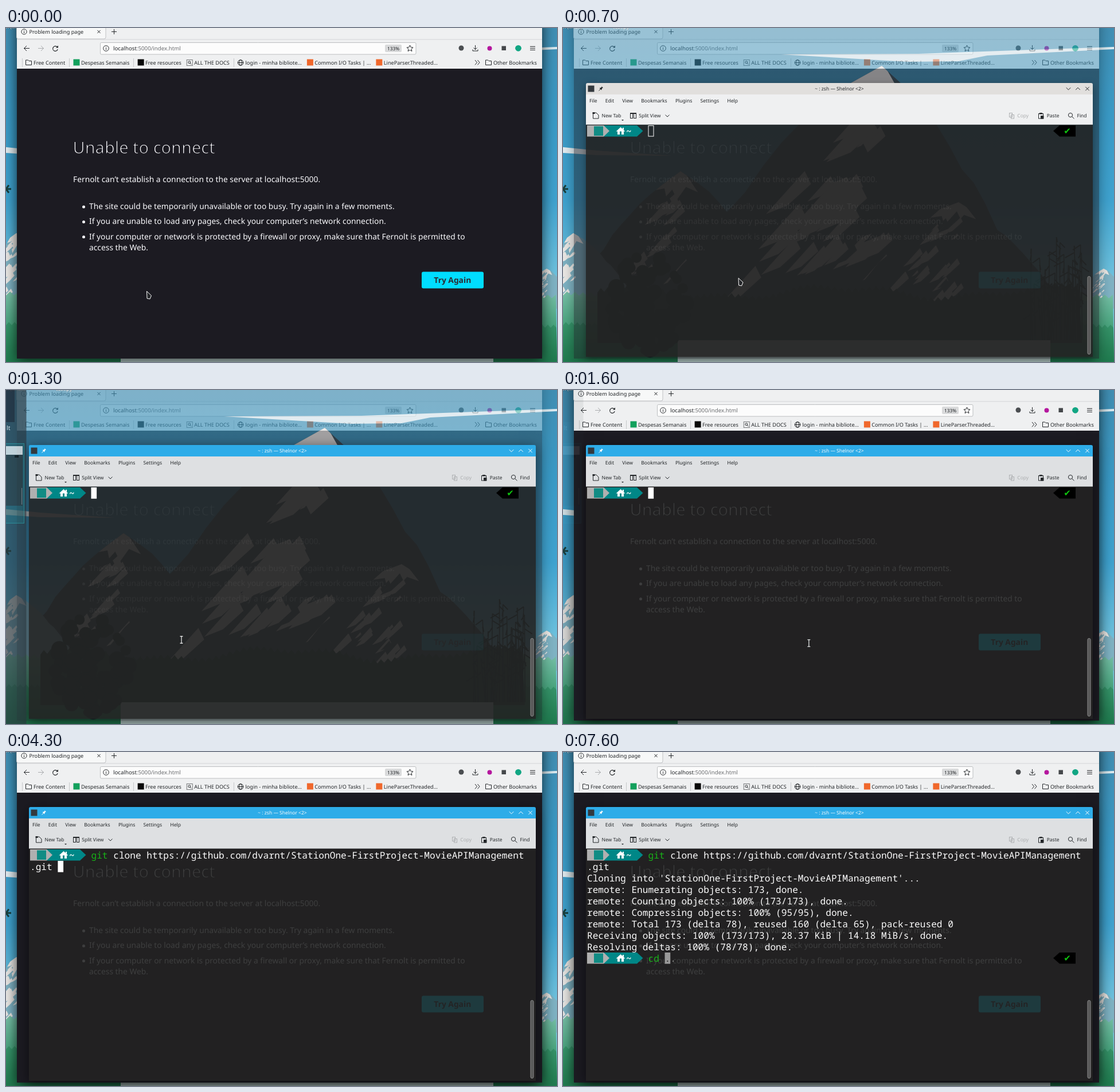
Write an HTML page with a canvas that moves like this. It is 961x583 px and loops after 8000 ms.

```html
<!DOCTYPE html>
<html lang="en">
<head>
<meta charset="utf-8">
<title>Cloning a repository</title>
<style>
html, body { margin: 0; width: 100%; height: 100%; overflow: hidden; background: #2b6f98; }
canvas { display: block; width: 961px; height: 583px; }
</style>
</head>
<body>
<canvas id="stage" width="961" height="583"></canvas>
<script>
const W = 961, H = 583, LOOP = 8000;
const SANS = '"Noto Sans", "Open Sans", sans-serif';
const MONO = '"Noto Sans Mono", "DejaVu Sans Mono", monospace';
const INK = '#232629', SNOW = '#ebe9e6';

const clamp = v => Math.max(0, Math.min(1, v));
const ramp = (t, from, length) => clamp((t - from) / length);
const mix = (a, b, u) => a + (b - a) * u;

// ---------- drawing helpers ----------
function rect(g, x, y, w, h, fill) { g.fillStyle = fill; g.fillRect(x, y, w, h); }

function frameBox(g, x, y, w, h, color = INK) {
  g.strokeStyle = color; g.lineWidth = 1; g.strokeRect(x, y, w, h);
}

function round(g, x, y, w, h, r, fill, stroke) {
  g.beginPath(); g.roundRect(x, y, w, h, r);
  g.fillStyle = fill; g.fill();
  if (stroke) { g.strokeStyle = stroke; g.lineWidth = 1; g.stroke(); }
}

function trace(g, pts) {
  g.beginPath();
  for (let i = 0; i < pts.length; i += 2) g.lineTo(pts[i], pts[i + 1]);
}

function poly(g, pts, fill, stroke) {
  trace(g, pts); g.closePath();
  if (fill) { g.fillStyle = fill; g.fill(); }
  if (stroke) { g.strokeStyle = stroke; g.lineWidth = 1; g.stroke(); }
}

function line(g, pts, color = INK, width = 1) {
  trace(g, pts); g.strokeStyle = color; g.lineWidth = width; g.stroke();
}

function disc(g, x, y, r, fill) {
  g.beginPath(); g.arc(x, y, r, 0, 7); g.fillStyle = fill; g.fill();
}

function ring(g, x, y, rx, ry = rx, color = INK) {
  g.beginPath(); g.ellipse(x, y, rx, ry, 0, 0, 7);
  g.strokeStyle = color; g.lineWidth = 1; g.stroke();
}

// Draws text and returns its width.
function text(g, s, x, y, size, color = INK, weight = 400, align = 'left') {
  g.font = `${weight} ${size}px ${SANS}`;
  g.textAlign = align; g.fillStyle = color;
  g.fillText(s, x, y);
  return g.measureText(s).width;
}

function cross(g, x, y, r, color) {
  line(g, [x - r, y - r, x + r, y + r], color);
  line(g, [x - r, y + r, x + r, y - r], color);
}

function chevron(g, x, y, r, dir, color) {
  line(g, [x - r, y - dir * r / 2, x, y + dir * r / 2, x + r, y - dir * r / 2], color);
}

// Shadow only outside the box, so translucent windows stay clean.
function shadow(g, x, y, w, h, blur, alpha) {
  g.save();
  g.beginPath(); g.rect(0, 0, W, H); g.rect(x, y, w, h); g.clip('evenodd');
  g.shadowColor = `rgba(0,0,0,${alpha})`; g.shadowBlur = blur; g.shadowOffsetY = 4;
  rect(g, x, y, w, h, '#000');
  g.restore();
}

function vertical(g, y0, y1, colors) {
  const grad = g.createLinearGradient(0, y0, 0, y1);
  colors.forEach((c, i) => grad.addColorStop(i / (colors.length - 1), c));
  return grad;
}

function layer(draw) {
  const c = document.createElement('canvas');
  c.width = W; c.height = H;
  const g = c.getContext('2d');
  g.textRendering = 'geometricPrecision';
  draw(g);
  return c;
}

function randomFrom(seed) {
  return () => (seed = (seed * 16807) % 2147483647) / 2147483647;
}

// ---------- desktop ----------
function streak(g, x, y, l, fill) {
  poly(g, [x, y, x - l * .9, y + l, x - l * .4, y + l * .8, x + l * .15, y + l * .3], fill);
}

// A peak with concave, jagged flanks and snow falling to the lower left.
function mountain(g, x, y, base, left, right, rock, count, seed) {
  const rnd = randomFrom(seed), h = base - y, steps = 12, pts = [];
  for (let i = -steps; i <= steps; i++) {
    const v = Math.abs(i) / steps, span = i < 0 ? -left : right;
    pts.push(x + span * v ** .75, y + h * v + (i % steps ? (rnd() - .5) * h * .04 : 0));
  }
  g.save();
  poly(g, pts, rock);
  trace(g, pts); g.clip();
  poly(g, [x, y - 9, x - left * .32, y + h * .16, x - left * .14, y + h * .13,
    x - left * .1, y + h * .3, x + right * .05, y + h * .12, x + right * .16, y + h * .16], SNOW);
  for (let i = 0; i < count; i++) {
    const v = .08 + rnd() * .75, sx = x + (rnd() * .75 - .65) * left * v ** .75;
    streak(g, sx, y + h * v, h * (.06 + rnd() * .16), i % 4 ? SNOW : rock);
  }
  g.restore();
}

function ridge(g, x0, x1, base, amp, step, bottom, fill) {
  const pts = [x0, bottom];
  for (let x = x0; x <= x1; x += step) {
    const wave = Math.sin(x / 61) + Math.sin(x / 23 + 2) * .5 + (x / step & 1 ? .5 : -.3);
    pts.push(x, base - amp * wave);
  }
  pts.push(x1, bottom);
  poly(g, pts, fill);
}

function desktop(g) {
  const rnd = randomFrom(77), rock = '#3b525d', leaf = '#10302f';
  rect(g, 0, 0, W, H, vertical(g, 0, 450, ['#418fb4', '#3a9ac6', '#3fa3d0', '#74c6e0']));
  poly(g, [380, 46, 620, 45, 961, 33, 961, 37, 740, 48, 690, 58, 600, 59], '#dcebf1');
  poly(g, [0, 208, 60, 214, 190, 223, 60, 222, 0, 218], '#e4eef2');
  mountain(g, 205, 250, 480, 200, 190, rock, 22, 5);
  mountain(g, 556, 66, 490, 400, 270, rock, 46, 9);
  mountain(g, 690, 304, 490, 210, 190, rock, 34, 21);
  mountain(g, 18, 358, 475, 70, 110, '#7fb3c4', 40, 3);
  mountain(g, 943, 420, 490, 60, 60, '#7fb3c4', 40, 14);
  ridge(g, 0, W, 468, 8, 7, H, vertical(g, 455, H, ['#7cc4ac', '#4aa57f', '#23794f']));
  ridge(g, 0, W, 520, 7, 5, H, vertical(g, 505, H, ['#3b9a70', '#1f7a4e']));
  ridge(g, 60, 905, 462, 9, 6, 550, '#1d443c');
  rect(g, 200, 545, 650, 38, '#b9cfcc');
  for (let i = 0; i < 90; i++) {
    const v = rnd(), wide = 65 * Math.sin(Math.PI * (.15 + v * .7));
    disc(g, 150 + (rnd() * 2 - 1) * wide, 400 + v * 165, 7 + rnd() * 8, leaf);
  }
  for (let i = 0; i < 34; i++) {
    const x = 815 + rnd() * 90, y = 362 + rnd() * 120;
    line(g, [x, y, x + 8 - rnd() * 16, 545], leaf, 1.5);
    for (let k = 0; k < 3; k++) line(g, [x, y + k * 12, x + (rnd() - .5) * 36, y + k * 12 + 9], leaf, 2);
  }
  for (let a = -3; a < 4; a++) line(g, [0, 281, 9 * Math.cos(a), 281 + 8 * Math.sin(a)], '#173f3c', 3);
  g.shadowColor = '#000'; g.shadowBlur = 2;
  text(g, 'vm (linux)', -8, 1, 9, '#fff');
  text(g, 'test.py', 87, 1, 9, '#fff');
}

// ---------- browser ----------
function info(g, x, y, r) {
  ring(g, x, y, r);
  rect(g, x - .5, y - .5, 1, 3, INK);
  rect(g, x - .5, y - 2.6, 1, 1.2, INK);
}

function arrow(g, x, dir, color) {
  line(g, [x - 5, 35.5, x + 5, 35.5], color);
  line(g, [x, 31, x + 4.5 * dir, 35.5, x, 40], color);
}

function toolbarIcons(g) {
  arrow(g, 36, -1, INK);
  arrow(g, 61, 1, '#aaacae');
  g.beginPath(); g.arc(86, 36, 4.3, .3, 5.5); g.strokeStyle = INK; g.lineWidth = 1.2; g.stroke();
  poly(g, [87, 34.5, 91, 34.5, 91, 30.5], INK);
  const star = [];
  for (let i = 0; i < 10; i++) {
    const a = i * Math.PI / 5 - Math.PI / 2, r = i % 2 ? 2.7 : 5.8;
    star.push(704.5 + r * Math.cos(a), 35.8 + r * Math.sin(a));
  }
  poly(g, star, null, INK);
  disc(g, 794, 35, 4.5, '#4b4e51');
  line(g, [818.5, 30, 818.5, 37.5]);
  chevron(g, 818.5, 36, 3, 1, INK);
  line(g, [814, 37.5, 814, 40, 823, 40, 823, 37.5]);
  disc(g, 843.5, 35.5, 4, '#b5179e');
  rect(g, 864.5, 31.5, 7.5, 7.5, '#45484b');
  disc(g, 893.5, 35.3, 5.4, '#11a683');
  for (let y = 32; y < 40; y += 3) line(g, [914, y + .3, 923, y + .3]);
}

// Bookmark icons, drawn from their left edge.
const square = color => (g, x) => rect(g, x, 54.5, 11, 11, color);

function folder(g, x) {
  poly(g, [x, 56, x + 4, 56, x + 5.5, 57.5, x + 10, 57.5, x + 10, 64.5, x, 64.5], null, INK);
}

function lens(g, x) {
  frameBox(g, x + .5, 55.5, 10, 10, '#77797b');
  ring(g, x + 5, 59.8, 2);
  line(g, [x + 6.5, 61.3, x + 8.5, 63.5]);
}

function globe(g, x) {
  ring(g, x + 5, 60.5, 4.8); ring(g, x + 5, 60.5, 2.2, 4.8);
  line(g, [x, 60.5, x + 10, 60.5]);
}

function bookmarks(g) {
  let x = 34.5;
  const separator = at => rect(g, Math.round(at), 53, 1, 15, '#c6c8ca');
  const item = (icon, label, last) => {
    icon(g, x);
    x += 13.4 + text(g, label, x + 13.4, 63.5, 9.15);
    if (last) separator(x + 7);
    x += last ? 14.3 : 9;
  };
  separator(28);
  item(folder, 'Free Content', true);
  item(square('#12a05c'), 'Despesas Semanais', true);
  item(square('#0a0a0a'), 'Free resources');
  item(lens, 'ALL THE DOCS', true);
  item(globe, 'login - minha bibliote...');
  item(square('#f0682c'), 'Common I/O Tasks | ...');
  item(square('#f0682c'), 'LineParser.Threaded...');
  for (const left of [818, 822.5]) line(g, [left, 56, left + 3.5, 60.2, left, 64.4]);
  x = 836.5;
  item(folder, 'Other Bookmarks');
}

function errorPage(g) {
  const ink = '#fbfbfe', paper = '#1c1b22';
  rect(g, 19, 71, 916, 506, paper);
  // The heading is thinned by shaving its edges with the page colour.
  const title = 'Unable to connect';
  text(g, title, 116.5, 219, 29, ink);
  g.strokeStyle = paper; g.lineWidth = 1.2; g.lineJoin = 'round';
  g.strokeText(title, 116.5, 219);
  g.lineJoin = 'miter';
  text(g, 'Fernolt can’t establish a connection to the server at localhost:5000.', 117, 269, 13.8, ink);
  ['The site could be temporarily unavailable or too busy. Try again in a few moments.',
   'If you are unable to load any pages, check your computer’s network connection.',
   'If your computer or network is protected by a firewall or proxy, make sure that Fernolt is permitted to'
  ].forEach((s, i) => {
    const y = 316 + i * 26.25;
    text(g, s, 145, y, 13.8, ink);
    disc(g, 135.5, y - 3.7, 2.5, ink);
  });
  text(g, 'access the Web.', 145, 388, 13.8, ink);
  round(g, 725, 425.5, 108, 29, 3, '#00ddff');
  text(g, 'Try Again', 778.8, 445.2, 13.8, '#2b2a33', 700, 'center');
}

function browser(g) {
  shadow(g, 19, -20, 916, 597, 22, .75);
  rect(g, 19, 0, 916, 71, '#eff0f1');
  rect(g, 19, 19.5, 916, 1, '#d3d5d7');
  round(g, 18.5, -8, 155.5, 27, 3, '#f7f8f8', '#bfc1c3');
  info(g, 31.5, 6.5, 4.6);
  text(g, 'Problem loading page', 40.5, 10.3, 9.15);
  cross(g, 162, 6.5, 2.6, INK);
  line(g, [184, 6.5, 193, 6.5]); line(g, [188.5, 2, 188.5, 11]);
  round(g, 164.5, 25.5, 550.5, 20.5, 2, '#fcfcfc', '#bcbec0');
  info(g, 174.5, 35.5, 4.8);
  const host = text(g, 'localhost', 187, 39, 9.7);
  text(g, ':5000/index.html', 187 + host, 39, 9.7, '#6b6d70');
  round(g, 661, 29, 29, 13, 2, '#d9dadb');
  text(g, '133%', 675.5, 38.6, 8.3, INK, 400, 'center');
  toolbarIcons(g);
  bookmarks(g);
  errorPage(g);
}

// ---------- window switcher at the left edge ----------
function switcher(g) {
  rect(g, 0, 0, 35.5, H, 'rgba(42,54,62,.8)');
  rect(g, 0, 0, 15, 56, 'rgba(28,30,42,.8)');
  text(g, 'lt', 1, 70, 10.5, '#fcfcfc');
  rect(g, -2, 93.5, 33.5, 139, 'rgba(30,130,140,.35)');
  frameBox(g, -2, 93.5, 33.5, 139, '#2a8c92');
  rect(g, 0, 98, 29, 15, '#dfe3e5');
  rect(g, 0, 113, 29, 89, '#2a3a40');
  rect(g, 15, 114, 7, 4, '#0c0f10');
  rect(g, 27, 171, 1.2, 29, '#7a8488');
}

// ---------- terminal ----------
const CELL = 9.68, LEFT = 42, TOP = 170, COLS = 89, START = 11;
const REPO = 'StationOne-FirstProject-MovieAPIManagement';
const CLONE = `git clone https://github.com/dvarnt/${REPO}.git `;
const CHANGE = 'cd ..';
const OUTPUT = [
  'remote: Enumerating objects: 173, done.',
  'remote: Counting objects: 100% (173/173), done.',
  'remote: Compressing objects: 100% (95/95), done.',
  'remote: Total 173 (delta 78), reused 160 (delta 65), pack-reused 0',
  'Receiving objects: 100% (173/173), 28.37 KiB | 14.18 MiB/s, done.',
  'Resolving deltas: 100% (78/78), done.'
];
const GREEN = '#18b218', RED = '#e04040', WHITE = '#fcfcfc', GHOST = '#8b8b8b';

const place = (col, row) => [LEFT + col % COLS * CELL, TOP + (row + Math.floor(col / COLS)) * 20];
const keysDown = (t, times) => times.filter(k => t >= k).length;

function print(g, s, col, row, color) {
  g.font = `16.13px ${MONO}`; g.textAlign = 'left'; g.fillStyle = color;
  [...s].forEach((ch, i) => {
    const [x, y] = place(col + i, row);
    g.fillText(ch, x, y + 15.6);
  });
}

function block(g, col, row, active, under) {
  const [x, y] = place(col, row);
  if (!active) return frameBox(g, x + .5, y + .5, 9, 18.5, WHITE);
  rect(g, x, y, CELL, 19.7, under ? '#999' : '#fff');
  if (under) print(g, under, col, row, '#222');
}

function tag(g, x0, x1, tip, y, fill) {
  poly(g, [x0, y, x1, y, tip, y + 9.8, x1, y + 19.6, x0, y + 19.6], fill);
}

function prompt(g, row) {
  const y = TOP + row * 20;
  tag(g, 71, 129, 139.5, y, '#008787');
  tag(g, 42, 71, 81, y, '#b0b0b0');
  rect(g, 54, y + 1.5, 16, 16.5, '#128c84');
  poly(g, [92.5, y + 10.5, 100.5, y + 3, 108.5, y + 10.5], '#fff');
  rect(g, 95, y + 9, 4, 7, '#fff'); rect(g, 102, y + 9, 4, 7, '#fff');
  rect(g, 104, y + 4, 2, 4, '#fff');
  g.font = `700 16.13px ${MONO}`; g.textAlign = 'left'; g.fillStyle = '#fff';
  g.fillText('~', 110, y + 15.6);
}

function tick(g, row) {
  const y = TOP + row * 20;
  tag(g, 894, 866, 855, y, '#000');
  g.font = '15px "DejaVu Sans", sans-serif'; g.textAlign = 'center'; g.fillStyle = '#0fc20f';
  g.fillText('✔', 879.5, y + 15.3);
}

// A command being typed, with the rest of the suggestion in grey.
function command(g, full, count, word, hint, row, active) {
  const color = hint || count >= word ? GREEN : RED;
  print(g, full.slice(0, Math.min(count, word)), START, row, color);
  print(g, full.slice(word, count), START + word, row, WHITE);
  if (hint) print(g, full.slice(count), START + count, row, GHOST);
  if (active !== null) block(g, START + count, row, active, hint ? full[count] : '');
}

function shell(g, t, active) {
  const pairs = Math.floor(3 * ramp(t, 2800, 600));
  const typed = keysDown(t, [2300, 2400, 2700, 2800]) + 2 * pairs;
  const hint = t >= 2700 && t < 4300, sent = t >= 5800;
  prompt(g, 0);
  if (t < 2700) tick(g, 0);
  command(g, CLONE, t < 4300 ? typed : CLONE.length, 3, hint, 0, sent ? null : active);
  if (!sent) return;
  print(g, `Cloning into '${REPO}'...`, 0, 2, WHITE);
  if (t < 6500) return block(g, 0, 3, true);
  OUTPUT.forEach((s, i) => print(g, s, 0, 3 + i, WHITE));
  prompt(g, 9);
  tick(g, 9);
  const n = keysDown(t, [7300, 7400, 7600]);
  command(g, CHANGE, n, 2, n > 0, 9, true);
}

function terminalTools(g) {
  const y = 156.3, dim = '#adafb1';
  let x = 46;
  for (const s of ['File', 'Edit', 'View', 'Bookmarks', 'Plugins', 'Settings', 'Help'])
    x += text(g, s, x, 130, 8.55) + 14.2;
  poly(g, [52.5, 148, 58, 148, 62, 152, 62, 158, 52.5, 158], null, INK);
  rect(g, 51.5, 147, 4, 3, INK);
  text(g, 'New Tab', 67.5, y, 8.5);
  poly(g, [102, 160, 106, 160, 104, 162], INK);
  for (const left of [117.5, 123.5]) frameBox(g, left, 148.5, 4, 9);
  rect(g, 117, 148, 11, 2, INK);
  text(g, 'Split View', 132.3, y, 8.5);
  chevron(g, 182, 153.3, 3.5, 1, INK);
  frameBox(g, 778.5, 148.5, 5, 7, dim); frameBox(g, 781.5, 151.5, 5, 6.5, dim);
  text(g, 'Copy', 792.3, y, 8.5, dim);
  frameBox(g, 829.5, 149.5, 8, 8.5);
  rect(g, 831, 148, 5, 2.5, INK); rect(g, 833, 153, 5.5, 5.5, INK);
  text(g, 'Paste', 843.7, y, 8.5);
  ring(g, 885, 152, 3.6); line(g, [887.6, 154.6, 891.5, 158.3]);
  text(g, 'Find', 896.5, y, 8.5);
}

function terminal(g, t) {
  const active = t >= 1300, ink = active ? WHITE : INK;
  shadow(g, 40, 96, 884, 478, active ? 20 : 12, active ? .55 : .4);
  rect(g, 40, 168, 884, 406, 'rgba(35,35,35,.875)');
  round(g, 40, 96, 884, 24, [3, 3, 0, 0], active ? '#2eace8' : '#e1dfdd');
  rect(g, 40, 116, 884, 52, active ? '#dee0e2' : '#eff0f1');
  rect(g, 40, 168, 884, 1, active ? '#8f9193' : '#b5b7b9');
  rect(g, 43.5, 100.5, 11, 11, '#33393e');
  line(g, [62.5, 109.5, 65.5, 106.5], ink);
  poly(g, [63.5, 105, 67, 103.8, 67.5, 102, 70, 104.5, 68.2, 105, 67, 108.5], ink);
  const task = t >= 6200 && t < 7000 ? 'git' : 'zsh';
  text(g, `~ : ${task} — Shelnor <2>`, 482, 109, 8.5, ink, 400, 'center');
  chevron(g, 881.5, 106, 3.8, 1, ink);
  chevron(g, 898, 106, 3.8, -1, ink);
  cross(g, 914.5, 106, 3.2, ink);
  terminalTools(g);
  round(g, 915, 433.5, 5, 136, 2.5, '#565656', '#8b8b8b');
  shell(g, t, active);
}

// ---------- pointer ----------
function pointer(g, t) {
  if (t >= 2300) return;
  if (t < 1300) {
    const u = ramp(t, 0, 200), x = mix(245, 305.5, u), y = mix(459, 436, u);
    poly(g, [x + .5, y + .5, x + 8.5, y + 8, x + 6, y + 14, x + 1, y + 13], '#26282b', '#fff');
    return;
  }
  // A quick sideways flick that sinks as it slows down.
  const u = ramp(t, 1300, 600);
  const x = mix(306, 476, 1 - (1 - u) ** 1.85), y = mix(436, 467, u ** 2.4);
  const beam = [x - 2.5, y - 6, x + 2.5, y - 6, x, y - 6, x, y + 6, x - 2.5, y + 6, x + 2.5, y + 6];
  line(g, beam, '#1b1d1f', 3);
  line(g, beam, '#e8e8e8', 1.3);
}

// ---------- playback ----------
const wall = layer(desktop), web = layer(browser), side = layer(switcher);
const stage = document.getElementById('stage').getContext('2d');
stage.textRendering = 'geometricPrecision';

const webFade = t => 1 - .78 * (t < 1300 ? ramp(t, 500, 400) ** .6 : 1 - ramp(t, 1200, 400) ** 1.3);
const sideFade = t => ramp(t, 700, 200) * (1 - ramp(t, 1250, 500)) ** 2;

function image(src, alpha) {
  stage.globalAlpha = alpha;
  stage.drawImage(src, 0, 0);
  stage.globalAlpha = 1;
}

function draw(t) {
  image(wall, 1);
  image(web, t < 700 ? 1 : webFade(t));
  if (t >= 700) terminal(stage, t);
  image(side, sideFade(t));
  pointer(stage, t);
}

const start = performance.now();
let shown = -1;
function frame() {
  const t = Math.floor((performance.now() - start) % LOOP / 100) * 100;
  if (t !== shown) draw(shown = t);
  requestAnimationFrame(frame);
}
frame();
</script>
</body>
</html>
```
